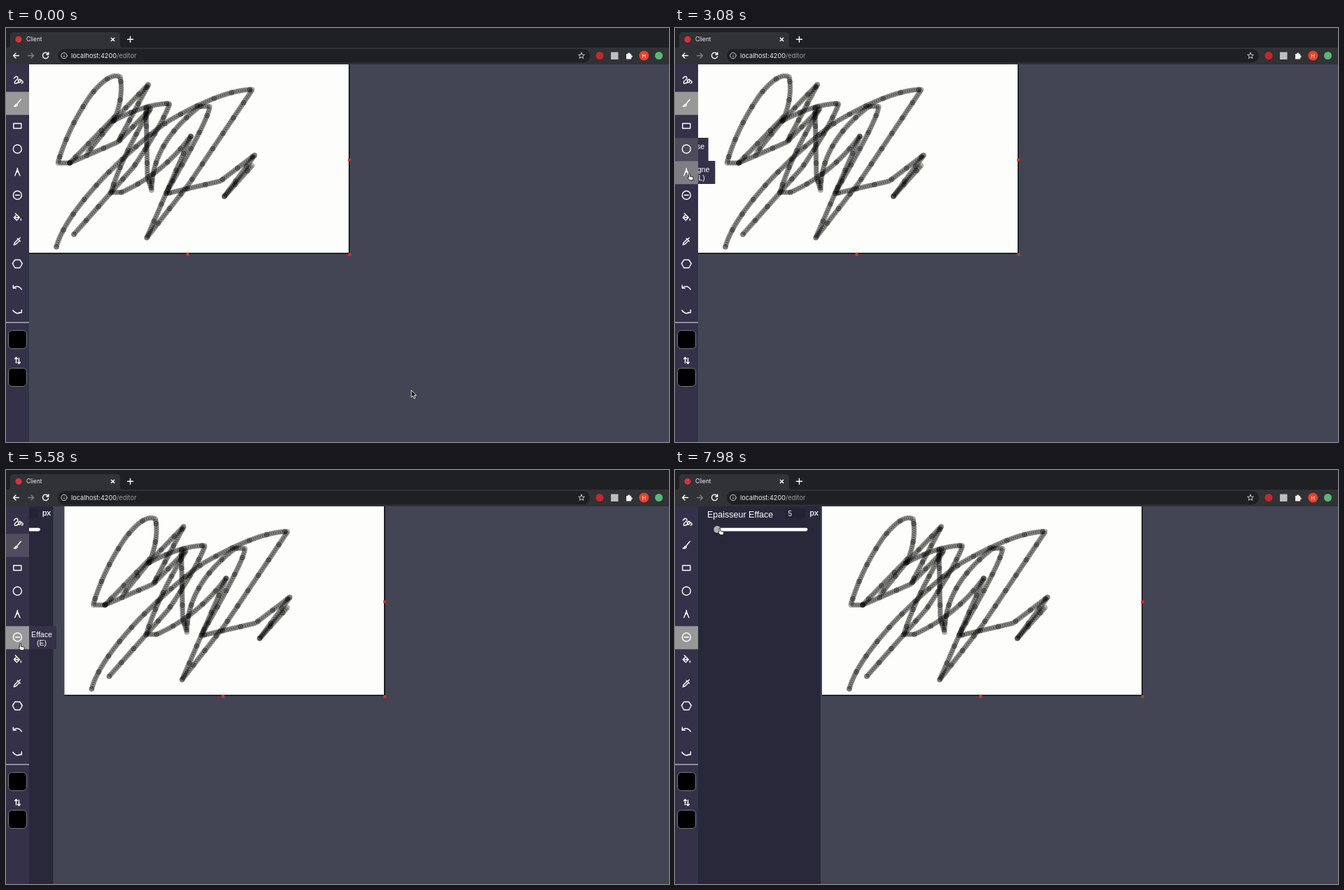
An HTML page that plays this animation: 947 px wide and 592 px high, repeating every 8 s.

```html
<!DOCTYPE html>
<html lang="fr">
<head>
<meta charset="utf-8">
<title>Client</title>
<style>
  html, body { margin: 0; width: 100%; height: 100%; overflow: hidden; background: #444554; }
  svg { display: block; width: 947px; height: 592px; }
  .ui { font-family: "Liberation Sans", Arial, sans-serif; fill: #fff; }
  .chrome { font-family: Inter, Roboto, sans-serif; }
  .icon { fill: none; stroke: #fff; stroke-width: 1.4; stroke-linecap: round; stroke-linejoin: round; }
</style>
</head>
<body>
<svg viewBox="0 0 947 592">
  <g id="artboard">
    <rect x="33" y="52" width="458" height="271"/>
    <rect x="33" y="52" width="456.5" height="269.5" fill="#fdfdfb"/>
    <g id="scribble" fill-opacity=".29" stroke="#000" stroke-opacity=".16" stroke-width=".8"></g>
    <path d="M488.5 188.5h4M257.500 324h4M489 324h4" stroke="#e52a2a" stroke-width="4"/>
  </g>

  <g id="panel" class="ui">
    <rect x="33" y="52" width="175" height="540" fill="#28283a"/>
    <text x="46" y="67.5" font-size="12.5">Epaisseur Efface</text>
    <rect x="157" y="55" width="29" height="14" fill="#222231"/>
    <text x="161.5" y="65.5" font-size="10">5</text>
    <text x="192.5" y="65" font-size="11.5" stroke="#fff" stroke-width=".25">px</text>
    <rect x="58" y="82.7" width="131.5" height="4.8" rx="2.4"/>
    <circle cx="60.3" cy="85" r="5" fill="#b1b1b3"/>
  </g>

  <g id="tips" class="ui" font-size="10.6" text-anchor="middle"></g>
  <rect y="52" width="33" height="540" fill="#353148"/>
  <g id="highlights" fill="#999899"></g>
  <g id="icons" class="icon"></g>
  <path class="icon" d="M14.500 479v-8m-1.800 2l1.800-2 1.800 2M18.500 472v8m-1.800-2l1.800 2 1.800-2"/>
  <rect y="420.5" width="33" height="1.2" fill="#c9c9cd"/>
  <g stroke="#77767f">
    <rect x="3.5" y="432.5" width="26" height="26" rx="5"/>
    <rect x="3.5" y="486.5" width="26" height="26" rx="5"/>
  </g>

  <g class="chrome">
    <rect width="947" height="28" fill="#1e2024"/>
    <path d="M2 28q4 0 4-4V11q0-5 5-5h147q5 0 5 5v13q0 4 4 4z" fill="#303236"/>
    <rect y="28" width="947" height="24" fill="#303236"/>
    <rect x="74" y="30" width="760" height="19.5" rx="9.7" fill="#1e2024"/>
    <circle cx="18" cy="16.3" r="4.6" fill="#d6323a"/>
    <text x="29" y="19.3" font-size="8.3" fill="#f1f1f2">Client</text>
    <text x="93" y="43" font-size="9.2" fill="#f1f1f2">localhost:4200<tspan fill="#9b9da1">/editor</tspan></text>
    <g class="icon">
      <path d="M150.300 14.200l4.400 4.400m0-4.400l-4.400 4.400M173.500 16.300h8m-4-4v8"/>
      <path d="M18.500 39.500h-8m3.500-3.500l-3.500 3.500 3.500 3.500"/>
      <path d="M31.500 39.500h8m-3.500-3.500l3.500 3.500-3.500 3.500" stroke="#7d7f83"/>
      <path d="M60.300 37.300a4.200 4.200 0 1 0 .3 3.500M60.800 35v3h-3"/>
      <g stroke="#c8c9cc" stroke-width="1">
        <circle cx="83" cy="39.5" r="4.2"/><path d="M83 39.500v2M83 37.400v.1"/>
        <path id="star"/>
      </g>
    </g>
    <circle cx="848" cy="39.5" r="5.5" fill="#c9252c"/>
    <rect x="864" y="34.5" width="10.5" height="10.5" fill="#bcbdbd"/>
    <path d="M886 37h7v7.500h-7zM888 37a1.700 1.700 0 0 1 3.400 0zM893 39a1.700 1.700 0 0 1 0 3.400z" fill="#f1f1f2"/>
    <circle cx="911.3" cy="39.5" r="7" fill="#e8402c"/>
    <text x="911.3" y="42.6" font-size="8" text-anchor="middle" fill="#fff">H</text>
    <circle cx="932.5" cy="39.5" r="5.5" fill="#59b878"/>
  </g>

  <g id="cursor">
    <path id="arrow" d="M0 0v10l2.300-2.100 1.700 3.900 1.700-.8-1.700-3.700h3z" stroke="#fff" stroke-width=".9"/>
    <path id="hand" d="M-1 1a1 1 0 0 1 2 0v3.200l3.800.8q1 .3.900 1.400L5 9.800H.6l-3.200-3.600q.4-1.200 1.600-.3z" fill="#fff" stroke="#000" stroke-width=".8"/>
  </g>
</svg>

<script>
const LOOP = 8000, CLICK = 5410, ROW = 33, TOP = 58;
const byId = id => document.getElementById(id);
const clamp = v => Math.min(1, Math.max(0, v));
const rowY = row => TOP + ROW * row;
const move = (el, x, y = 0) => el.setAttribute("transform", `translate(${x} ${y})`);

function add(parent, tag, attrs, text = "") {
  const el = document.createElementNS(parent.namespaceURI, tag);
  for (const key in attrs) el.setAttribute(key, attrs[key]);
  el.textContent = text;
  return parent.appendChild(el);
}

// Eased progress along a CSS-style cubic Bézier.
function bezier(x1, y1, x2, y2) {
  const at = (a, b, s) => 3 * (1 - s) * s * ((1 - s) * a + s * b) + s ** 3;
  return value => {
    const x = clamp(value);
    if (x === 0 || x === 1) return x;
    let low = 0, high = 1;
    for (let i = 0; i < 20; i++) {
      const mid = (low + high) / 2;
      if (at(x1, x2, mid) < x) low = mid; else high = mid;
    }
    return at(y1, y2, low);
  };
}
const ease = bezier(.25, .1, .25, 1);
const swift = bezier(.25, .8, .25, 1);

// Brush strokes: translucent dots stamped along a few curves, some twice.
const strokes = [
  "M72 313Q82 275 140 213Q195 158 232 133Q310 88 352 88L262 222 201 300 265 153",
  "M97 295L182 199Q222 140 234 108Q200 108 153 133L115 180",
  "M91 193H74Q90 140 121 96Q148 62 163 70Q168 95 157 125L91 193",
  "M153 133L204 80 160 163",
  "M91 193L160 163 207 115Q165 185 150 235H165Q225 208 265 153",
  "M200 114L202 212 208 232Q208 165 277 112H291Q290 130 228 237L306 219 356 181 311 242 353 195"
];
const scribble = byId("scribble");
for (const d of strokes) {
  const path = add(scribble, "path", { d }), length = path.getTotalLength();
  for (let s = 0, i = 0; s < length; s += 3.3, i++) {
    const { x, y } = path.getPointAtLength(s);
    for (let n = i % 8 ? 1 : 2; n; n--) add(scribble, "circle", { cx: x, cy: y, r: 3.6 });
  }
  path.remove();
}

// Icons drawn around their own centre, one per toolbar row.
const icons = [
  "M-5-2q3-4 5-2t-1 4-3 4 3 1 3-4 4 0 0 4M1 1q4-3 4 0t-3 3",
  "M5-5L0 1M-1 2q-2 0-2 2l-2 1q4 1 5-2z",
  "M-5.500-3.500h11v7h-11z",
  "M-6 0a6 6 0 1 0 12 0 6 6 0 1 0-12 0",
  "M-3.500 5l3.500-9 3.500 9M0-5.500v2M-2 1l2-2 2 2",
  "M-6 0a6 6 0 1 0 12 0 6 6 0 1 0-12 0M-3 0h6",
  "M-3-7l6 6-4 4-4-4 4-4M-4-1h6M5 1v2",
  "M-5 5l1-3 5-5 2 2-5 5zM0-4l4 4M2-3l2-2",
  "M-3.500-6.500h7L7-1 3.500 5h-7L-7-1z",
  "M-6-3v4h4M-5.500 0q7-4 11.500 3",
  "M6-1v4H2M5.500 2.500q-7 4-12-3"
];
icons.forEach((d, row) => move(add(byId("icons"), "path", { d }), 16.3, rowY(row) + 16));

const starPoints = Array.from({ length: 10 }, (_, i) => {
  const angle = i * Math.PI / 5, r = i % 2 ? 2 : 4.6;
  return `${822 + r * Math.sin(angle)} ${39.7 - r * Math.cos(angle)}`;
});
byId("star").setAttribute("d", `M${starPoints.join("L")}z`);

// The pointer arrives at each stop and hovers over the toolbar row below it.
const stops = [
  { at: 0, x: 579, y: 518 },
  { at: 760, x: 20.5, y: 248 },
  { at: 1850, x: 20.5, y: 208 },
  { at: 2235, x: 20.5, y: 166 },
  { at: 2900, x: 20.5, y: 208 },
  { at: 3560, x: 20.5, y: 248 },
  { at: 7450, x: 64, y: 83 }
];
const visits = row => stops.flatMap(({ at, x, y }, i) =>
  x < ROW && Math.floor((y - TOP) / ROW) === row ? [[at, stops[i + 1].at]] : []);

const tools = [
  { row: 1, name: "Pinceau", key: "W", active: [-LOOP, CLICK] },
  { row: 3, name: "Ellipse", key: "2" },
  { row: 4, name: "Ligne", key: "L" },
  { row: 5, name: "Efface", key: "E", active: [CLICK, 2 * LOOP] }
];
for (const tool of tools) {
  const y = rowY(tool.row);
  tool.hovers = visits(tool.row);
  tool.tip = add(byId("tips"), "g", {});
  add(tool.tip, "rect", { x: 33, y, width: 39, height: ROW, fill: "#353148" });
  add(tool.tip, "text", { x: 51, y: y + 16 }, tool.name);
  add(tool.tip, "text", { x: 51, y: y + 28 }, `(${tool.key})`);
  tool.light = add(byId("highlights"), "rect", { y: y + .3, width: 33, height: ROW });
}
const presence = (t, spans, duration) => spans.reduce((sum, [start, end]) =>
  sum + ease((t - start) / duration) - ease((t - end) / duration), 0);

function cursorAt(t) {
  let { x, y } = stops[0];
  for (const stop of stops.slice(1)) {
    const dx = stop.x - x, dy = stop.y - y, travel = 120 + Math.hypot(dx, dy);
    const u = clamp(1 + (t - stop.at) / travel), p = u * u * (3 - 2 * u);
    x += dx * p;
    y += dy * p;
  }
  return [x, y];
}

function draw(t) {
  move(byId("artboard"), 177 * swift((t - CLICK) / 1950));
  move(byId("panel"), -175 * (1 - swift((t - CLICK - 62) / 1800)));
  for (const tool of tools) {
    move(tool.tip, -39 * (1 - presence(t, tool.hovers, 500)));
    const active = tool.active ? presence(t, [tool.active], 400) : 0;
    tool.light.setAttribute("opacity", clamp(Math.max(active, presence(t, tool.hovers, 400))));
  }
  const [x, y] = cursorAt(t), pointing = x < ROW || (x < 67 && y < 92);
  move(byId("cursor"), x, y);
  byId("hand").style.display = pointing ? "" : "none";
  byId("arrow").style.display = pointing ? "none" : "";
}

const start = performance.now();
function frame() {
  draw((performance.now() - start) % LOOP);
  requestAnimationFrame(frame);
}
frame();
</script>
</body>
</html>
```
